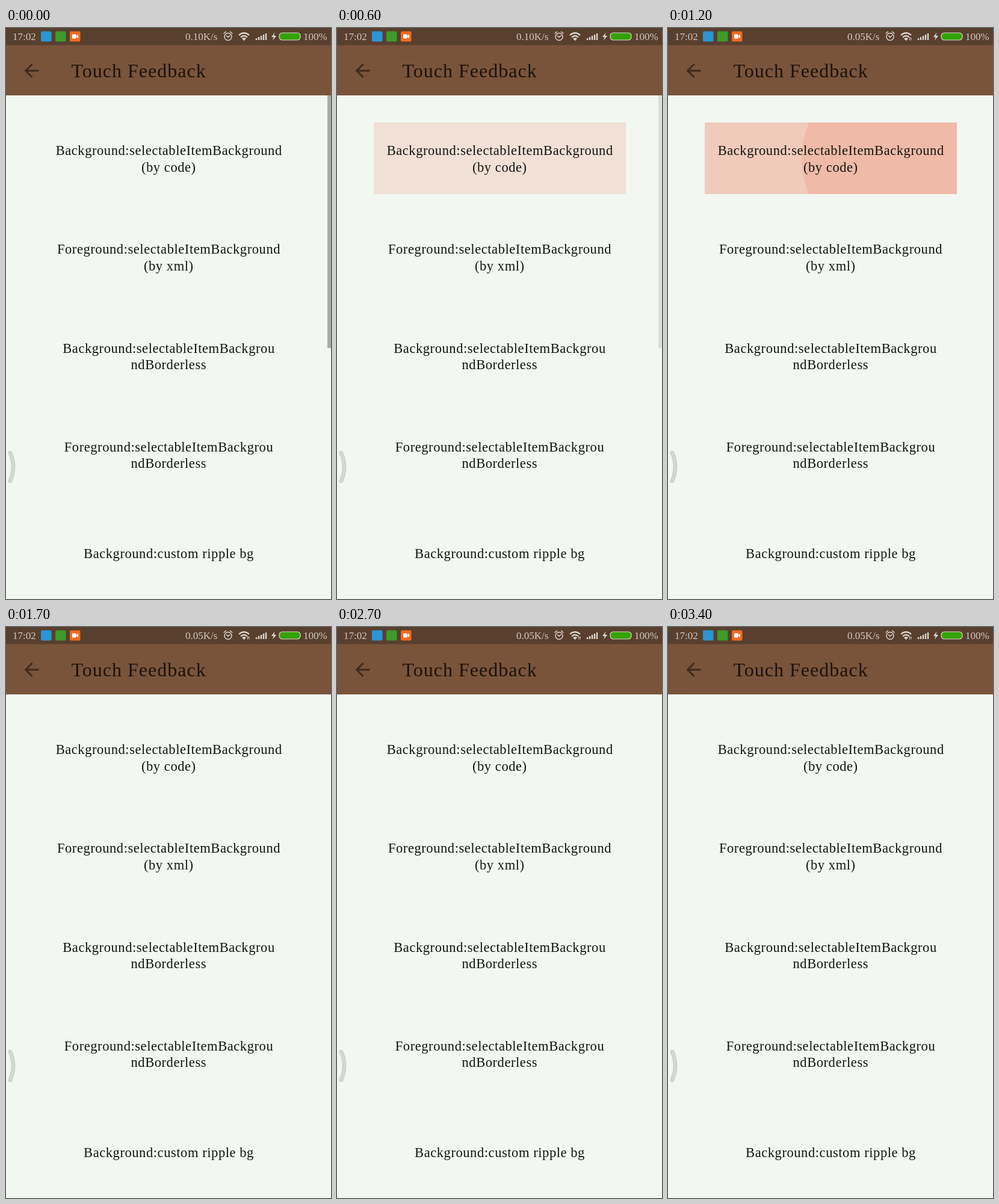
An HTML page that plays this animation: 540 by 949 pixels, repeating every 3500 ms.

```html
<!DOCTYPE html>
<html lang="en">
<head>
<meta charset="utf-8">
<title>Touch Feedback</title>
<style>
  html, body { margin: 0; width: 100%; height: 100%; overflow: hidden; background: #f2f7f1; }
  svg { display: block; width: 540px; height: 949px; }
  text { font-family: "Liberation Serif", "Times New Roman", serif; }
  .status { font-size: 17px; fill: #d3c9c1; }
  .title { font-size: 32px; letter-spacing: 1px; fill: #1d120b; }
  .label { font-size: 22.5px; letter-spacing: .57px; text-anchor: middle; fill: #121412; }
  .tint { fill: rgb(235, 97, 59); }

  /* Every change lands on a 100 ms tick of the 3.5 s loop. */
  .anim { animation: 3.5s steps(1) infinite; }
  .bar { animation-name: bar; }
  .early { animation-name: early; }
  .late { animation-name: late; }
  .fill1 { animation-name: fill1; }
  .wave1 { animation-name: grow1, fade1; }
  .fill4 { animation-name: fill4; }
  .wave4 { animation-name: grow4, fade4; }

  @keyframes bar {
    0% { opacity: 1; }
    11.42% { opacity: 1; animation-timing-function: steps(3); }
    19.99%, 100% { opacity: 0; }
  }
  @keyframes early { 0% { opacity: 1; } 25.71%, 100% { opacity: 0; } }
  @keyframes late { 0% { opacity: 0; } 25.71%, 100% { opacity: 1; } }

  @keyframes fill1 {
    0% { opacity: 0; }
    8.57% { opacity: 0; animation-timing-function: steps(6); }
    25.71% { opacity: .3; }
    34.28% { opacity: .3; animation-timing-function: steps(4); }
    45.71%, 100% { opacity: 0; }
  }
  @keyframes grow1 {
    0% { transform: translate(430px, 217px) scale(0); }
    19.99% { transform: translate(430px, 217px) scale(0); animation-timing-function: steps(5); }
    34.28% { transform: translate(372px, 217px) scale(150); animation-timing-function: steps(2); }
    39.99%, 100% { transform: translate(330px, 217px) scale(275); }
  }
  @keyframes fade1 {
    0% { opacity: 0; }
    22.85% { opacity: .143; }
    34.28% { opacity: .143; animation-timing-function: steps(4); }
    45.71%, 100% { opacity: 0; }
  }

  @keyframes fill4 {
    0% { opacity: 0; }
    77.14% { opacity: 0; animation-timing-function: steps(2); }
    82.85% { opacity: .07; }
    85.71% { opacity: .07; animation-timing-function: steps(3); }
    94.28%, 100% { opacity: 0; }
  }
  @keyframes grow4 {
    0% { transform: translate(310px, 709px) scale(0); }
    77.14% { transform: translate(310px, 709px) scale(0); animation-timing-function: steps(2); }
    82.85% { transform: translate(291px, 709px) scale(185); }
    85.71%, 100% { transform: translate(270px, 709px) scale(220); }
  }
  @keyframes fade4 {
    0% { opacity: 0; }
    79.99% { opacity: .18; }
    82.85% { opacity: .18; animation-timing-function: steps(4); }
    94.28%, 100% { opacity: 0; }
  }
</style>
</head>
<body>
<svg viewBox="0 0 540 949">
  <defs>
    <clipPath id="row1"><rect x="61" y="157" width="419" height="119"/></clipPath>
    <clipPath id="row4"><rect x="61" y="649.5" width="419" height="119"/></clipPath>
  </defs>
  <rect width="540" height="949" fill="#f2f7f1"/>

  <!-- Status bar -->
  <rect width="540" height="29" fill="#593f2e"/>
  <text class="status" x="11" y="20">17:02</text>
  <rect x="58" y="5.5" width="17.5" height="17" rx="2" fill="#2b96d6"/>
  <rect x="82" y="5.5" width="17.5" height="17" rx="2" fill="#3d9a2b"/>
  <rect x="106" y="5.5" width="17.5" height="17" rx="2" fill="#f36a21"/>
  <path d="M110 10.5h6.5v7h-6.5zM117 13l3-2.2v6.4l-3-2.2z" fill="#fff"/>
  <text class="status anim early" x="298" y="20">0.10K/s</text>
  <text class="status anim late" x="298" y="20">0.05K/s</text>
  <g fill="none" stroke="#ddd5cf" stroke-width="1.5" stroke-linecap="round">
    <circle cx="369" cy="14.5" r="6"/>
    <path d="M366.5 13l2.5 2.5 3-2.8M362 9l3.5-2.8M376 9l-3.5-2.8"/>
    <path stroke-width="2.2" stroke-linecap="butt" d="M387 12q8.500-7.500 17 0M390 15.500q5.500-5 11 0"/>
  </g>
  <path d="M392 17.500q3.500-2.500 7 0l-3.500 3.800z" fill="#ddd5cf"/>
  <path class="anim late" d="M401.500 20.500v-4h2.500v4" fill="none" stroke="#ddd5cf"/>
  <path d="M416 20v-3M420 20v-5M424 20v-7M428 20v-9M432 20v-11" stroke="#ddd5cf" stroke-width="2.4"/>
  <path d="M446.500 7.500l-5.500 7.500h3.600l-1.600 5.500 6.300-7.500h-3.900z" fill="#ddd5cf"/>
  <rect x="454" y="8" width="35" height="12" rx="5" fill="#35a300" stroke="#ddd5cf" stroke-width="1.2"/>
  <text class="status" x="494" y="20" font-size="16">100%</text>

  <!-- Toolbar -->
  <rect y="28.500" width="540" height="83.500" fill="#79543b"/>
  <path transform="translate(24.500 53) scale(1.5)" fill="#3f2a1d"
    d="M20 11H7.830l5.590-5.590L12 4l-8 8 8 8 1.410-1.410L7.830 13H20z"/>
  <text class="title" x="108.500" y="81.500">Touch Feedback</text>
  <rect class="anim bar" x="534" y="112" width="6" height="420" fill="#a9ada8"/>

  <!-- The first ripple lies behind its label, the second in front -->
  <g class="tint" clip-path="url(#row1)">
    <rect class="anim fill1" x="61" y="157" width="419" height="119"/>
    <circle class="anim wave1" r="1"/>
  </g>
  <g class="label">
    <text x="270.700" y="211">Background:selectableItemBackground</text>
    <text x="270.300" y="238.500">(by code)</text>
    <text x="270.500" y="375">Foreground:selectableItemBackground</text>
    <text x="270.300" y="402.500">(by xml)</text>
    <text x="270.500" y="539.500">Background:selectableItemBackgrou</text>
    <text x="270.300" y="567">ndBorderless</text>
    <text x="270.500" y="703.500">Foreground:selectableItemBackgrou</text>
    <text x="270.300" y="731">ndBorderless</text>
    <text x="270.500" y="880.500">Background:custom ripple bg</text>
  </g>
  <g class="tint" clip-path="url(#row4)">
    <rect class="anim fill4" x="61" y="649.500" width="419" height="119"/>
    <circle class="anim wave4" r="1"/>
  </g>

  <!-- Edge handle -->
  <g fill="none" stroke-linecap="round">
    <path d="M7 706q10 23 0 47" stroke="#c3c7c2" stroke-width="6.500"/>
    <path d="M7 706q10 23 0 47" stroke="#d5d9d4" stroke-width="4.500"/>
  </g>
</svg>
</body>
</html>
```
